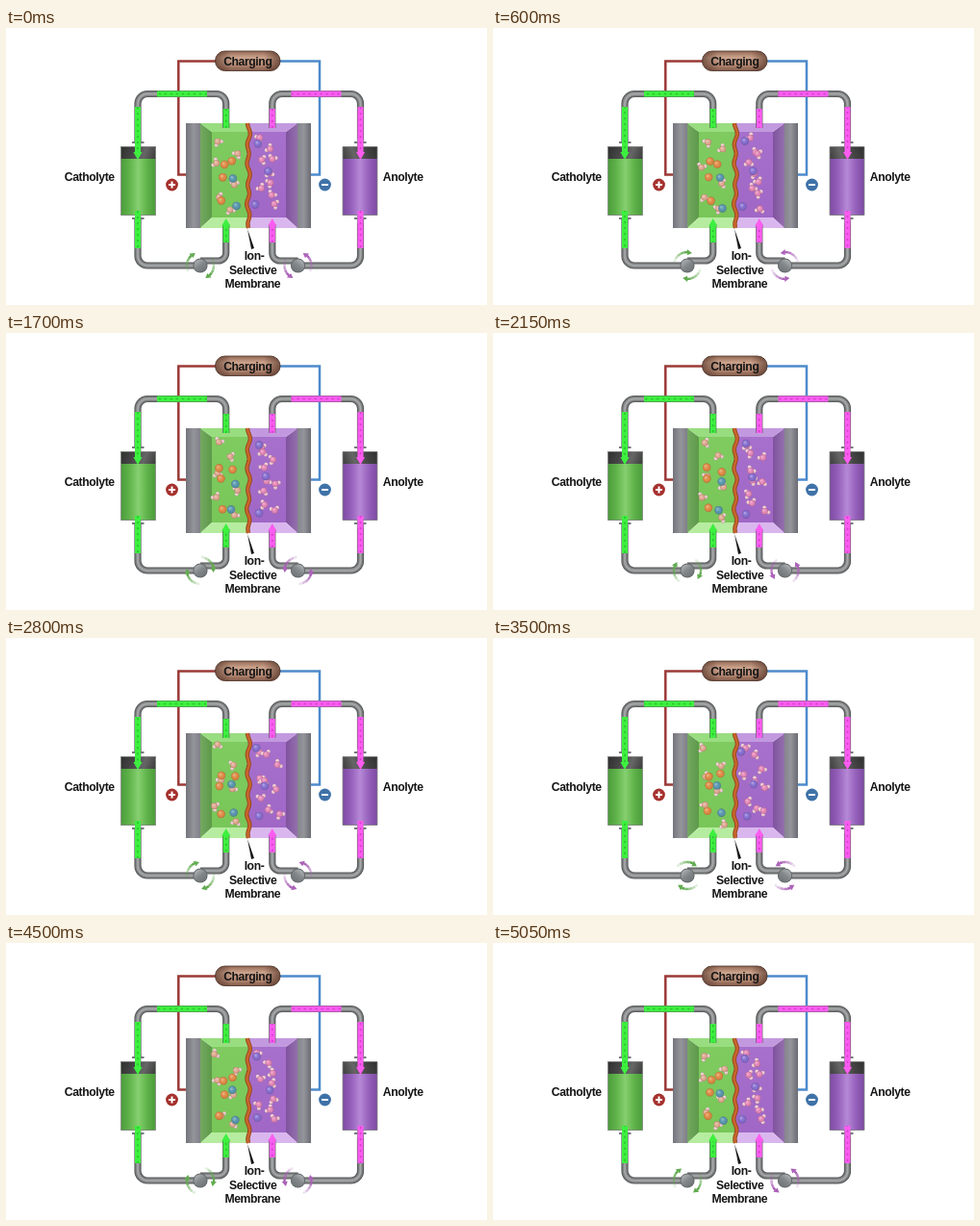
Animation, 500 px wide and 288 px high, one loop 5.1 s. Source, as an HTML page with a canvas:

```html
<!DOCTYPE html>
<html lang="en">
<head>
<meta charset="utf-8">
<title>Flow battery charging</title>
<style>
html, body { margin: 0; width: 500px; height: 288px; overflow: hidden; background: #fff; }
canvas { display: block; }
</style>
</head>
<body>
<canvas id="stage" width="500" height="288"></canvas>
<script>
const ctx = document.getElementById('stage').getContext('2d');
const LOOP = 5100, STEP = 50, TAU = Math.PI * 2;
const GREEN = { bright: '#3df03f', tick: '#2bc42f', arrow: '#62ab50', edge: '#4a9a3a', mid: '#5fb34a', light: '#86cf70' };
const PINK = { bright: '#fb5cf0', tick: '#d53fcf', arrow: '#ab62b8', edge: '#7b48a0', mid: '#9560bb', light: '#b688d6' };
const ORANGE = '#dd8136', BLUE = '#4b8ea8', ROSE = '#dca287', BERRY = '#e27fb2', VIOLET = '#7b62cc';

function poly(fill, ...pts) {
  ctx.fillStyle = fill;
  ctx.beginPath();
  for (let i = 0; i < pts.length; i += 2) ctx.lineTo(pts[i], pts[i + 1]);
  ctx.closePath();
  ctx.fill();
}

function blend(x0, y0, x1, y1, ...colors) {
  const g = ctx.createLinearGradient(x0, y0, x1, y1);
  colors.forEach((c, i) => g.addColorStop(i / (colors.length - 1), c));
  return g;
}

function box(x, y, w, h, fill) {
  ctx.fillStyle = fill;
  ctx.fillRect(x, y, w, h);
}

function disc(x, y, r, fill) {
  ctx.fillStyle = fill;
  ctx.beginPath();
  ctx.arc(x, y, r, 0, TAU);
  ctx.fill();
}

function line(color, width, trace) {
  ctx.strokeStyle = color;
  ctx.lineWidth = width;
  ctx.beginPath();
  trace();
  ctx.stroke();
}

function label(text, x, y) {
  ctx.fillStyle = '#151515';
  ctx.font = 'bold 12.2px "Liberation Sans", Arial, sans-serif';
  ctx.letterSpacing = '-0.4px';
  ctx.textAlign = 'center';
  ctx.fillText(text, x, y);
}

// A rounded tube is a stack of ever thinner, lighter strokes.
function tube(trace) {
  for (let i = 0; i < 4; i++) {
    const v = 88 + i * 26;
    line(`rgb(${v},${v + 2},${v + 3})`, 7.2 - i * 1.9, trace);
  }
}

function stream(x0, y0, x1, y1, c, shift) {
  const len = Math.hypot(x1 - x0, y1 - y0);
  ctx.save();
  ctx.translate(x0, y0);
  ctx.rotate(Math.atan2(y1 - y0, x1 - x0));
  box(0, -3, len, 6, c.bright);
  ctx.beginPath();
  ctx.rect(0, -3, len, 6);
  ctx.clip();
  for (let x = shift % 6 - 6; x < len; x += 6) box(x, -0.8, 2.2, 1.6, c.tick);
  ctx.restore();
}

function head(x, y, dir, color) {
  poly(color, x, y + 5 * dir, x - 4.6, y - 3 * dir, x + 4.6, y - 3 * dir);
}

function pump(x, y, t, c) {
  disc(x, y, 7.6, '#62676a');
  disc(x, y, 6.6, blend(x - 5, y - 6, x + 4, y + 6, '#b3b6b8', '#83888b', '#6f7477'));
  ctx.save();
  ctx.translate(x, y);
  ctx.rotate(0.4 + t / LOOP * TAU);
  for (let half = 0; half < 2; half++) {
    ctx.rotate(Math.PI);
    for (let i = 0; i < 5; i++) {
      ctx.globalAlpha = (i + 1) / 5;
      const a = -0.85 + i * 0.26;
      line(c.arrow, 2.4, () => ctx.arc(0, 0, 14, a, a + 0.26));
    }
    ctx.save();
    ctx.rotate(0.42);
    poly(c.arrow, 10.8, 0, 17, 0, 13, 5);
    ctx.restore();
  }
  ctx.restore();
}

function tank(c) {
  for (const y of [115, 194]) {
    box(134, y, 6.5, 9, '#85898c');
    box(131, y + 3, 12.5, 2, '#74797c');
  }
  box(119.5, 123, 36, 72, blend(119, 0, 156, 0, c.edge, c.mid, c.light, c.mid, c.edge));
  box(119.5, 123, 36, 13, blend(119, 123, 156, 136, '#2e2e2e', '#444', '#666', '#3a3a3a'));
  line('rgba(130,135,130,.8)', 1, () => ctx.rect(119.5, 123.5, 36, 71));
}

function loopPipe(c, t) {
  const shift = t / LOOP * 6 * 24;
  tube(() => {
    ctx.moveTo(137, 118);
    ctx.arcTo(137, 68.5, 150, 68.5, 10);
    ctx.arcTo(228.7, 68.5, 228.7, 80, 10);
    ctx.lineTo(228.7, 104);
  });
  tube(() => {
    ctx.moveTo(137, 198);
    ctx.arcTo(137, 247, 150, 247, 10);
    ctx.lineTo(202, 247);
  });
  tube(() => {
    ctx.moveTo(202, 242);
    ctx.arcTo(228.7, 242, 228.7, 230, 8);
    ctx.lineTo(228.7, 204);
  });
  tank(c);
  stream(228.7, 104, 228.7, 84, c, shift);
  stream(209, 68.5, 157, 68.5, c, shift);
  stream(137, 82, 137, 130, c, shift);
  head(137, 132, 1, c.bright);
  stream(137, 190, 137, 229, c, shift);
  stream(228.7, 223, 228.7, 203, c, shift);
  head(228.7, 203, -1, c.bright);
  pump(202, 247, t, c);
}

function mirrored(draw) {
  ctx.save();
  ctx.translate(505.5, 0);
  ctx.scale(-1, 1);
  draw();
  ctx.restore();
}

function wire(color, from, side, to) {
  line(color, 2.5, () => {
    ctx.moveTo(from, 34.5);
    ctx.lineTo(side, 34.5);
    ctx.lineTo(side, 152.5);
    ctx.lineTo(to, 152.5);
  });
}

function charger() {
  wire('#9b3a37', 220, 179.3, 188);
  wire('#4d8bcb', 282, 326, 316);
  ctx.beginPath();
  ctx.roundRect(217.5, 24, 67.5, 20.5, 10);
  ctx.fillStyle = blend(0, 24, 0, 45, '#946a56', '#cda48d', '#b98d77', '#7c5444');
  ctx.fill();
  ctx.fillStyle = blend(217, 0, 285, 0, 'rgba(60,30,20,.6)', 'rgba(60,30,20,0)', 'rgba(60,30,20,0)', 'rgba(60,30,20,0)', 'rgba(60,30,20,.6)');
  ctx.fill();
  line('rgba(70,45,35,.8)', 1, () => ctx.roundRect(217.5, 24, 67.5, 20.5, 10));
  label('Charging', 251.3, 38.5);
}

function sign(x, color, plus) {
  disc(x, 163, 6.4, color);
  box(x - 3.5, 162, 7, 2, '#fff');
  if (plus) box(x - 1, 159.5, 2, 7, '#fff');
}

function cell() {
  box(187, 99, 16, 109, blend(187, 0, 203, 0, '#73737b', '#94949b', '#7d7d85'));
  box(302, 99, 15, 109, blend(302, 0, 317, 0, '#83838b', '#94949b', '#6b6b74'));
  poly(blend(202, 0, 214, 0, '#74a862', '#5d9a49'), 202, 99, 214, 108, 214, 197, 202, 208);
  poly(blend(291, 0, 303, 0, '#80529f', '#9470ad'), 291, 108, 303, 99, 303, 208, 291, 197);
  box(214, 108, 38, 89, blend(0, 108, 0, 197, '#7fcb60', '#78c658'));
  box(252, 108, 39, 89, blend(0, 108, 0, 197, '#a770cc', '#a067c6'));
  poly('#98dd7f', 202, 99, 252, 99, 252, 108, 214, 108);
  poly('#c299df', 252, 99, 303, 99, 291, 108, 252, 108);
  poly('#b6ec9f', 214, 197, 252, 197, 252, 208, 202, 208);
  poly('#d9b7ee', 252, 197, 291, 197, 303, 208, 252, 208);
}

function membrane() {
  const trace = () => {
    for (let y = 99; y <= 208; y++) ctx.lineTo(252 + 1.2 * Math.sin(y * 0.3) + 0.6 * Math.sin(y * 0.13), y);
  };
  line('#95481f', 4.4, trace);
  line('#c8652b', 2.6, trace);
}

function ball(x, y, r, color) {
  disc(x, y, r, color);
  const g = ctx.createRadialGradient(x - r * 0.35, y - r * 0.4, 0, x, y, r);
  g.addColorStop(0, 'rgba(255,255,255,.45)');
  g.addColorStop(0.6, 'rgba(255,255,255,.05)');
  g.addColorStop(1, 'rgba(70,40,50,.28)');
  disc(x, y, r, g);
}

// Every particle drifts around its home on its own closed curve.
function wander(x, y, seed, reach, t) {
  const w = t / LOOP * TAU;
  return [
    x + reach * (Math.sin(w + seed * 2.1) + 0.5 * Math.sin(2 * w + seed)),
    y + reach * (Math.cos(w + seed * 1.7) + 0.6 * Math.sin(3 * w + seed * 2.6))
  ];
}

function water(x, y, seed, color, t) {
  const [cx, cy] = wander(x, y, seed, 3, t);
  const spin = t / LOOP * TAU * 2 + seed * 1.3;
  for (const a of [spin, spin + 1.9]) ball(cx + 4 * Math.cos(a), cy + 4 * Math.sin(a), 2, '#ecc6cb');
  ball(cx, cy, 3.3, color);
}

function ion(x, y, seed, color, t) {
  ball(...wander(x, y, seed, 2.2, t), 4.2, color);
}

function particles(t) {
  for (let i = 0; i < 6; i++) water(i % 2 ? 237 : 220, 115 + i * 15, i, ROSE, t);
  for (let i = 0; i < 9; i++) water(264 + i * 7 % 20, 116 + i * 8.5, i + 6, BERRY, t);
  for (let i = 0; i < 3; i++) ion(261 + i * 10 % 19, 117 + i * 34, i + 15, VIOLET, t);
  for (let i = 0; i < 4; i++) {
    const a = TAU * (i / 4 - 0.375);
    ion(230 + 8 * Math.cos(a), 148 + 9 * Math.sin(a), i + 1, i === 2 ? BLUE : ORANGE, t);
  }
  ion(224, 181, 6, ORANGE, t);
  ion(237, 184, 7, BLUE, t);
}

function draw(t) {
  box(0, 0, 500, 288, '#fff');
  charger();
  cell();
  particles(t);
  membrane();
  loopPipe(GREEN, t);
  mirrored(() => loopPipe(PINK, t));
  sign(172.5, '#a5312e', true);
  sign(331.5, '#3f72a8', false);
  label('Catholyte', 86.7, 159.3);
  label('Anolyte', 412.7, 159.3);
  poly('#151515', 251, 209, 258, 229, 255, 230);
  label('Ion-', 258, 241.3);
  label('Selective', 256.7, 255.5);
  label('Membrane', 256.3, 270);
}

function frame() {
  draw(Math.floor(performance.now() % LOOP / STEP) * STEP);
  requestAnimationFrame(frame);
}
frame();
</script>
</body>
</html>
```
